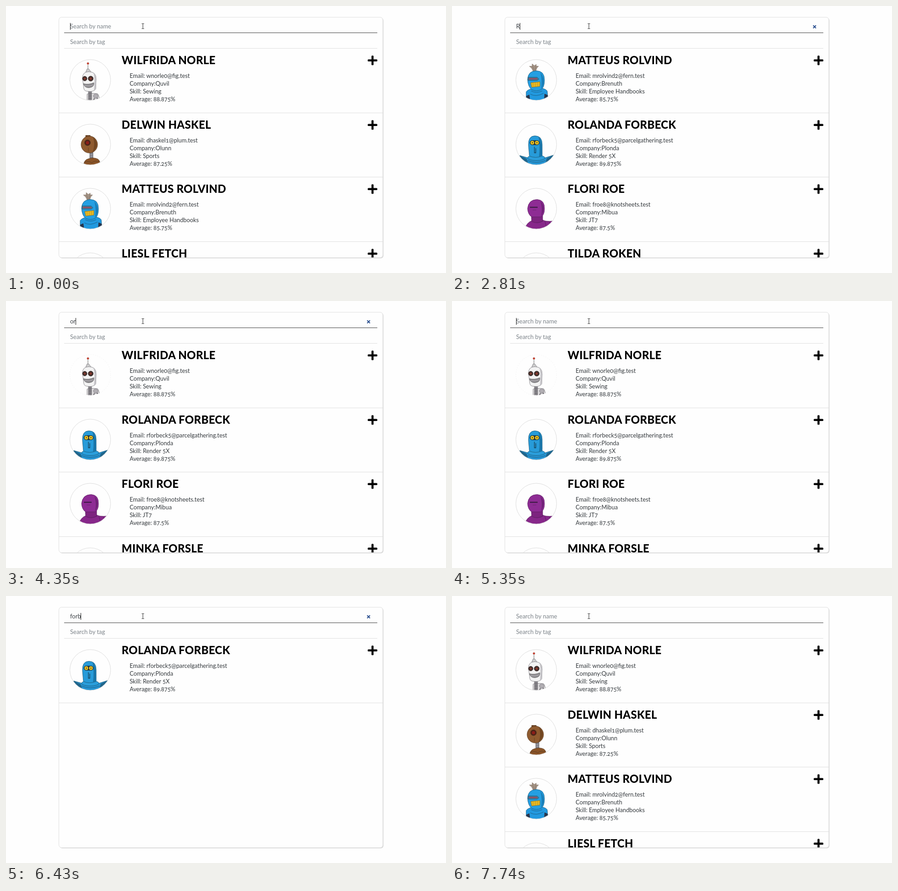
These frames come from a looping animation (961 by 583 pixels, 8 s). An HTML page:

```html
<!DOCTYPE html>
<html lang="en">
<head>
<meta charset="utf-8">
<title>Student search</title>
<style>
  html, body { margin: 0; width: 100%; height: 100%; overflow: hidden; background: #fefefe; }
  svg { display: block; }
  text { font-family: Raleway, Lato, "Open Sans", sans-serif; font-variant-numeric: oldstyle-nums; white-space: pre; }
  .name { font-size: 24px; font-weight: 800; letter-spacing: .3px; fill: #000; }
  .info { font-size: 12.8px; fill: #34393d; }
  .field { font-size: 13px; fill: #3c4146; }
  .hint { fill: #7d848a; }
  .ring { fill: none; stroke: #dcdcdc; }
  .soft { stroke: #f3f3f3; stroke-dasharray: 2 3; }
</style>
</head>
<body>
<svg id="stage" width="961" height="583" viewBox="0 0 961 583">
  <defs>
    <clipPath id="inside"><rect x="116" y="93" width="707" height="456" rx="5"/></clipPath>
    <clipPath id="disc"><circle r="44.5"/></clipPath>

    <g id="white-bot" stroke="#77757a" stroke-width=".8">
      <path d="M-7 45V31Q-2 28 6 29L16 30Q20 34 20 45Z" fill="#dedcde"/>
      <path d="M-4 25H3V45H-4Z" fill="#8d8b90"/>
      <path d="M-4 29H3M-4 33H3M-4 37H3M-4 41H3" stroke="#4c494e"/>
      <circle cx="12" cy="35" r="5" fill="#b0adb2"/>
      <path d="M9 40L7 45M15 39L18 45" stroke="#5d5a60" stroke-width="2"/>
      <path d="M-5-33V-24" stroke="#999" stroke-width="1.5"/>
      <path d="M-10-17L-7-24H-3L2-17Z" fill="#ccc"/>
      <circle cx="-5" cy="-36" r="2" fill="#d5402c" stroke="#9b3a30"/>
      <path d="M-17-4Q-17-18-3-18Q13-18 13-2L12 20Q7 26-3 25Q-13 25-14 19Z" fill="#f3f3f3"/>
      <path d="M7-14Q11-4 8 23L12 20L13-2Q12-11 7-14Z" fill="#c5c4c8" stroke="none"/>
      <g fill="#46302c" stroke="#302321"><circle cx="-12" cy="-3" r="5"/><circle cx="1" cy="-3" r="5.5"/></g>
      <g fill="#8f3a2e" stroke="none"><circle cx="-12" cy="-3" r="2"/><circle cx="1" cy="-3" r="2.3"/></g>
      <path d="M-15 8Q-4 11 8 6Q9 16-3 17Q-13 17-15 8Z" fill="#8f8d91" stroke="#666"/>
      <path d="M-12 12.5Q-3 14 6 11" fill="none" stroke="#c8c6ca"/>
    </g>

    <g id="brown-bot" stroke="#54361f" stroke-width=".8">
      <path d="M-1 17H6V34H-1Z" fill="#85858d" stroke="#55555c"/>
      <path d="M0 22H5M0 26H5M0 30H5" stroke="#b5b5bd"/>
      <path d="M-14 46Q-15 34-4 31Q8 27 17 32Q22 36 22 46Z" fill="#8a5428"/>
      <path d="M-13 39Q-2 35 3 40Q12 33 21 39" fill="none"/>
      <path d="M-10-14V-20H0V-14Z" fill="#75451f"/>
      <ellipse cx="-2" cy="0" rx="18" ry="18.5" fill="#8f5b30"/>
      <path d="M6-17Q24 1 4 18Q12 3 6-17Z" fill="#714621" stroke="none"/>
      <circle cx="-6" cy="-4" r="6.5" fill="#4b2218"/>
      <circle cx="-6" cy="-4" r="3.5" fill="#8d1d19" stroke="none"/>
      <path d="M-4 7V16" stroke="#5f3a1c"/>
    </g>

    <g id="tuft-bot" stroke="#1b5676" stroke-width=".8">
      <path d="M-7-19Q-8-25-15-30L-9-30L-9-35L-4-31L0-34L0-30L5-30Q-1-25 0-19Z" fill="#a39283" stroke="#84756b"/>
      <path d="M-5-20L-8-30M-3-20L-1-30" stroke="#7c6c62"/>
      <path d="M-22 46L-22 26Q-17 18 0 19Q18 16 24 24L26 46Z" fill="#2299df"/>
      <path d="M-22 46V35L-15 32L-13 46ZM26 46L25 33L18 30L17 46Z" fill="#27364d" stroke="none"/>
      <path d="M-13 31Q0 38 16 29M-11 24Q0 30 13 24" fill="none"/>
      <path d="M-19-1Q-18-20 0-20Q18-20 18 0Q18 16 11 21Q0 26-10 21Q-18 15-19-1Z" fill="#249fe2"/>
      <path d="M9-17Q24 3 10 21Q14 5 9-17Z" fill="#1a7eb8" stroke="none"/>
      <path d="M-18-6H2L6-2L2 1H-18Z" fill="#4a7791"/>
      <path d="M-16-2.5H2" stroke="#c82e42" stroke-width="1.5"/>
      <path d="M-12 6L8 4V14L-10 16Z" fill="#e7b824" stroke="#866d22"/>
      <path d="M-7 6V15M-2 6V15M3 5V14" stroke="#b8931f"/>
    </g>

    <g id="blue-bot" stroke="#1b526d" stroke-width=".8">
      <path d="M-36 46V24L-18 29Q0 21 19 29L38 23V46Z" fill="#2695d4"/>
      <path d="M-36 24L-21 31L-16 46H-40ZM38 23L23 30L18 46H42Z" fill="#20658b" stroke="none"/>
      <ellipse cx="0" cy="29" rx="19" ry="6" fill="#2b9edb"/>
      <path d="M-19 35Q0 43 20 35" fill="none"/>
      <path d="M-17 2Q-18-19-3-19Q13-19 13 0V25Q-2 31-15 25Z" fill="#279bd9"/>
      <path d="M5-17Q14-10 13 25L6 27Q9 4 5-17Z" fill="#1975a8" stroke="none"/>
      <rect x="-14" y="-9" width="21" height="10" rx="5" fill="#26343d"/>
      <g fill="#f0c51e" stroke="none"><circle cx="-8.5" cy="-4" r="3.9"/><circle cx="1.5" cy="-4" r="4.1"/></g>
      <g fill="#3a3320" stroke="none"><circle cx="-8.5" cy="-4" r="1.2"/><circle cx="1.5" cy="-4" r="1.2"/></g>
      <path d="M-4 5V18H-1V8" fill="none" stroke="#173e53" stroke-width="1.3"/>
    </g>

    <g id="purple-bot" stroke="#59205d" stroke-width=".8">
      <path d="M-26 46Q-21 30-9 26L13 24Q20 29 37 27V46Z" fill="#87288a"/>
      <path d="M19 28L24 46M28 28L35 46M-9 27Q2 34 15 27" fill="none" stroke="#511b57"/>
      <path d="M-11 10H14V27Q2 34-10 28Z" fill="#7d247f"/>
      <path d="M-19 0Q-17-20 2-20Q19-19 18 1Q18 13 11 18H-10Q-18 13-19 0Z" fill="#8e2c94"/>
      <path d="M9-17Q23-2 10 18Q15 1 9-17Z" fill="#6e2275" stroke="none"/>
      <path d="M-14-3H3" stroke="#33183a" stroke-width="2.2"/>
      <path d="M-8 3H0" stroke="#66206d"/>
    </g>
  </defs>

  <rect x="117" y="26" width="707.5" height="525" rx="6" fill="#d9d9d9"/>
  <rect x="115.5" y="24.5" width="707.5" height="525" rx="6" fill="#fefefe" stroke="#dfdfdf"/>
  <g id="rows" clip-path="url(#inside)"></g>

  <rect x="127" y="58" width="684" height="1" fill="#3b3b3b"/>
  <rect x="127" y="92" width="684" height="1" fill="#dedede"/>
  <text id="query" class="field" x="140" y="49"></text>
  <text class="field hint" x="140" y="83">Search by tag</text>
  <rect id="caret" y="37" width="1" height="15" fill="#111"/>
  <path id="clear" d="M788.8 42.3L795 48.5M795 42.3L788.8 48.5" stroke="#2d5190" stroke-width="2"/>
  <path d="M296.5 38.5H298.5L299 39L299.5 38.5H301.5M299 39V49M296.5 49.5H298.5L299 49L299.5 49.5H301.5" fill="none" stroke="#222"/>
</svg>
<script>
const LOOP = 8000, PITCH = 140.7, HINT = "Search by name";
const $ = id => document.getElementById(id);

// name, email, company, skill, average, avatar
const people = [
  ["WILFRIDA NORLE", "wnorle0@fig.test", "Quvil", "Sewing", "88.875", "white-bot"],
  ["DELWIN HASKEL", "dhaskel1@plum.test", "Olunn", "Sports", "87.25", "brown-bot"],
  ["MATTEUS ROLVIND", "mrolvind2@fern.test", "Brenuth", "Employee Handbooks", "85.75", "tuft-bot"],
  ["LIESL FETCH"],
  ["ROLANDA FORBECK", "rforbeck5@parcelgathering.test", "Plonda", "Render 5X", "89.875", "blue-bot"],
  ["FLORI ROE", "froe8@knotsheets.test", "Mibua", "JT7", "87.5", "purple-bot"],
  ["TILDA ROKEN"],
  ["MINKA FORSLE"]
];

// people shown, and how many leading avatars have a faint ring
const lists = {
  all: { who: [0, 1, 2, 3], faint: 0 },
  allFaint: { who: [0, 1, 2, 3], faint: 4 },
  ro: { who: [2, 4, 5, 6], faint: 0 },
  or: { who: [0, 4, 5, 7], faint: 1 },
  forb: { who: [4], faint: 0 }
};

// time, query, caret shown, list
const steps = [
  [0, "", 1, "all"], [250, "", 0, "all"], [400, "R", 1, "all"],
  [840, "Ro", 1, "all"], [1000, "Ro", 1, "ro"], [1270, "Ro", 0, "ro"],
  [1820, "Ro", 1, "ro"], [2380, "Ro", 0, "ro"], [2810, "R", 1, "ro"],
  [2940, "", 1, "ro"], [3200, "", 1, "allFaint"], [3330, "", 0, "allFaint"],
  [3920, "o", 1, "allFaint"], [4070, "or", 1, "allFaint"], [4350, "or", 1, "or"],
  [4620, "or", 0, "or"], [5050, "or", 1, "or"], [5200, "o", 1, "or"],
  [5350, "", 1, "or"], [5650, "", 1, "allFaint"], [5770, "f", 1, "allFaint"],
  [5890, "fo", 1, "allFaint"], [6010, "for", 1, "allFaint"], [6130, "forb", 1, "allFaint"],
  [6430, "forb", 1, "forb"], [6740, "forb", 0, "forb"], [6900, "for", 1, "forb"],
  [7050, "fo", 1, "forb"], [7200, "f", 1, "forb"], [7340, "", 1, "forb"],
  [7460, "", 1, "all"], [7740, "", 0, "all"]
];

function row(id, i, faint) {
  const [name, email, company, skill, average, bot] = people[id];
  const info = email
    ? [`Email: ${email}`, `Company:${company}`, `Skill: ${skill}`, `Average: ${average}%`]
    : [];
  return `<g transform="translate(0 ${Math.round(i * PITCH)})">
    <g transform="translate(184 161.5)">
      ${bot ? `<g clip-path="url(#disc)"><use href="#${bot}"/></g>` : ""}
      <circle class="ring ${faint ? "soft" : ""}" r="44.5"/>
    </g>
    <text class="name" x="252.5" y="127">${name}</text>
    ${info.map((line, n) => `<text class="info" x="270" y="${156.5 + n * 17}">${line}</text>`).join("")}
    <rect x="790" y="116.5" width="21" height="4.5" rx="1.5"/>
    <rect x="798.25" y="108.3" width="4.5" height="21" rx="1.5"/>
  </g>
  <rect x="116" y="${233 + Math.floor(i * PITCH)}" width="707" height="1" fill="#dfdfdf"/>`;
}

let shownStep, shownList;

function show(step) {
  const [, query, caretOn, list] = step;
  if (list !== shownList) {
    const { who, faint } = lists[list];
    $("rows").innerHTML = who.map((id, i) => row(id, i, i < faint)).join("");
    shownList = list;
  }
  const field = $("query");
  field.textContent = query || HINT;
  field.classList.toggle("hint", !query);
  const width = query ? field.getComputedTextLength() : 0;
  $("caret").setAttribute("x", 140 + Math.floor(width));
  $("caret").style.display = caretOn ? "" : "none";
  $("clear").style.display = query ? "" : "none";
}

function tick() {
  const t = performance.now() % LOOP;
  const step = steps.findLast(s => s[0] <= t);
  if (step !== shownStep) show(shownStep = step);
  requestAnimationFrame(tick);
}
tick();
</script>
</body>
</html>
```
